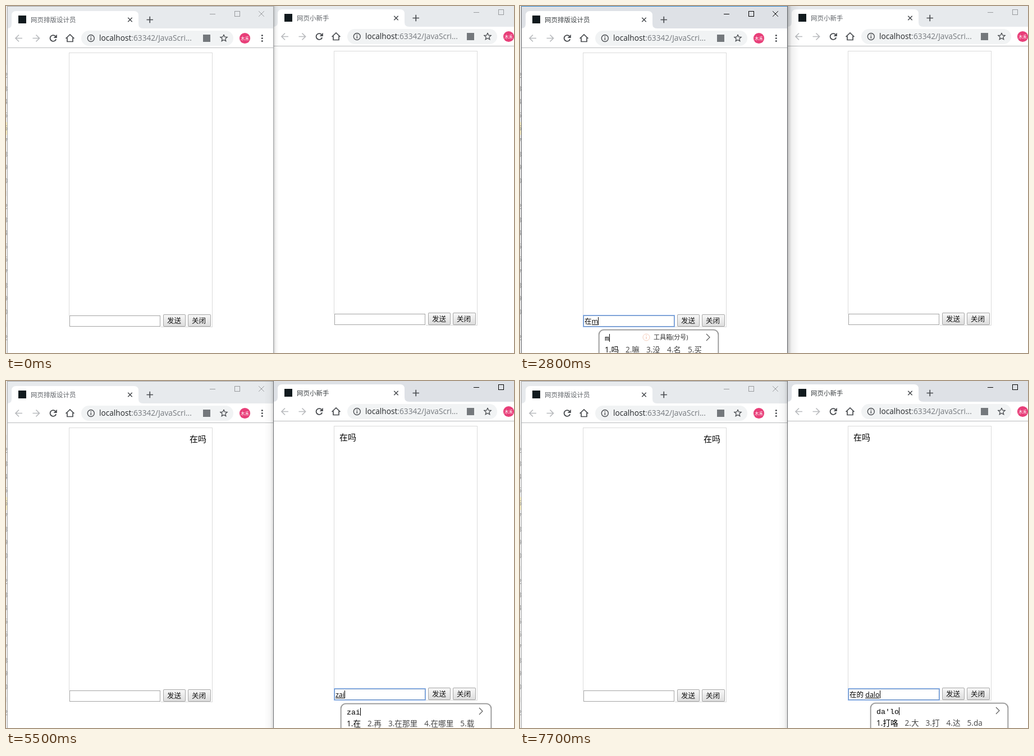
Write an HTML page with a canvas that moves like this. It is 905 by 619 pixels and loops after 8 s.

```html
<!DOCTYPE html>
<html lang="zh">
<head>
<meta charset="utf-8">
<style>
html, body { margin: 0; width: 905px; height: 619px; overflow: hidden; background: #fff; }
canvas { display: block; }
</style>
</head>
<body>
<canvas id="stage" width="905" height="619"></canvas>
<script>
const ctx = document.getElementById('stage').getContext('2d');
const LOOP = 8000;
const SANS = '"Open Sans", "Noto Sans CJK SC", "Noto Sans CJK", sans-serif';
const MONO = '"Liberation Mono", monospace';
const INK = '#4a4d51';

const popup = (left, right, top, typed, words, hint) =>
  ({ left, right, top, typed, words: words.split(' '), hint });
const D_WORDS = '的 到 点 _(:з」∠)_ の';
const M_WORDS = '吗 嘛 没 名 买';
const ZA_WORDS = '咋 砸 杂 咱 扎';
const ZAI_WORDS = '在 再 在那里 在哪里 载';
const DALO_WORDS = '打咯 大 打 达 da';

// Each entry changes the state from its time onwards.
const timeline = [
  [0, { active: '', text: '', comp: '', caret: false, pop: null, button: '', sent: false }],
  [900, { active: 'left', focus: 'left', caret: true }],
  [1400, { caret: false }],
  [1900, { comp: 'za', caret: true, pop: popup(124, 347, 576, 'za', ZA_WORDS) }],
  [2100, { comp: 'zai', pop: popup(124, 400, 576, 'zai', ZAI_WORDS) }],
  [2200, { text: '在', comp: '', pop: null }],
  [2400, { comp: 'm', pop: popup(140, 354, 577, 'm', M_WORDS) }],
  [2800, { pop: popup(140, 354, 577, 'm', M_WORDS, '工具箱(分号)') }],
  [2900, { comp: 'ma', pop: popup(140, 354, 577, 'ma', '吗 嘛 妈 马 骂') }],
  [3000, { text: '在吗', comp: '', pop: null }],
  [3500, { caret: false }],
  [3600, { button: 'hover' }],
  [3900, { button: 'pressed', focus: '' }],
  [4000, { button: 'hover', text: '', sent: true }],
  [4700, { active: 'right', focus: 'right', caret: true, button: '' }],
  [5200, { comp: 'z', pop: popup(596, 812, 575, 'z', '在 这 中 子 做') }],
  [5300, { comp: 'za', pop: popup(596, 812, 575, 'za', ZA_WORDS) }],
  [5500, { comp: 'zai', pop: popup(596, 865, 575, 'zai', ZAI_WORDS) }],
  [5700, { text: '在', comp: '', pop: null }],
  [6000, { comp: 'd', pop: popup(609, 854, 575, 'd', D_WORDS) }],
  [6200, { comp: 'de', pop: popup(609, 854, 575, 'de', '的 得 地 德 嘚') }],
  [6400, { text: '在的', comp: '', pop: null }],
  [6500, { text: '在的 ' }],
  [6700, { comp: 'd', pop: popup(625, 870, 575, 'd', D_WORDS) }],
  [6900, { comp: 'da', pop: popup(625, 893, 575, 'da', '大 打 达 搭 哒') }],
  [7200, { comp: 'dal', pop: popup(625, 904, 575, "da'l", '打了 大量 大理 打 大') }],
  [7600, { comp: 'dalo', pop: popup(625, 904, 575, "da'lo", DALO_WORDS) }],
  [7700, { pop: popup(624, 870, 574, "da'lo", DALO_WORDS) }]
];

const stateAt = t => Object.assign({}, ...timeline.filter(([at]) => at <= t).map(([, patch]) => patch));

function rect(x, y, w, h, fill) {
  ctx.fillStyle = fill;
  ctx.fillRect(x, y, w, h);
}

function frame(x, y, w, h, color) {
  ctx.strokeStyle = color;
  ctx.lineWidth = 1;
  ctx.strokeRect(x + .5, y + .5, w - 1, h - 1);
}

function line(color, width, ...strokes) {
  ctx.strokeStyle = color;
  ctx.lineWidth = width;
  ctx.beginPath();
  for (const points of strokes) {
    points.forEach(([x, y], i) => i ? ctx.lineTo(x, y) : ctx.moveTo(x, y));
  }
  ctx.stroke();
}

function round(x, y, w, h, radius, fill) {
  ctx.beginPath();
  ctx.roundRect(x, y, w, h, radius);
  ctx.fillStyle = fill;
  ctx.fill();
}

function disc(x, y, r, fill) {
  ctx.beginPath();
  ctx.arc(x, y, r, 0, 7);
  ctx.fillStyle = fill;
  ctx.fill();
}

function ring(x, y, r, color, width) {
  ctx.beginPath();
  ctx.arc(x, y, r, 0, 7);
  ctx.strokeStyle = color;
  ctx.lineWidth = width;
  ctx.stroke();
}

// Draws text and returns the x where it ends.
function label(str, x, y, size, color, family = SANS) {
  ctx.font = `${size}px ${family}`;
  ctx.fillStyle = color;
  ctx.fillText(str, x, y);
  return x + ctx.measureText(str).width;
}

function cross(x, y, r, color, width) {
  line(color, width, [[x - r, y - r], [x + r, y + r]], [[x + r, y - r], [x - r, y + r]]);
}

function arrow(x, y, dir) {
  line('#b9bbbe', 1.7, [[x - 6 * dir, y], [x + 6 * dir, y]],
    [[x, y - 6], [x + 6 * dir, y], [x, y + 6]]);
}

function reload(x, y) {
  ctx.beginPath();
  ctx.arc(x, y, 5.4, .3, 5.5);
  ctx.strokeStyle = INK;
  ctx.lineWidth = 1.9;
  ctx.stroke();
  ctx.beginPath();
  ctx.moveTo(x + 6.8, y - 6.8);
  ctx.lineTo(x + 6.8, y - .6);
  ctx.lineTo(x + .6, y - .6);
  ctx.fillStyle = INK;
  ctx.fill();
}

function home(x, y) {
  line(INK, 1.7, [[x - 7.5, y + .5], [x, y - 6.5], [x + 7.5, y + .5]],
    [[x - 5, y - 1], [x - 5, y + 6], [x + 5, y + 6], [x + 5, y - 1]]);
}

function star(x, y) {
  const points = Array.from({ length: 11 }, (_, i) => {
    const a = -Math.PI / 2 + i * Math.PI / 5, r = i % 2 ? 2.9 : 6.4;
    return [x + r * Math.cos(a), y + r * Math.sin(a)];
  });
  line(INK, 1.3, points);
}

function tab(title, active) {
  ctx.beginPath();
  ctx.moveTo(2, 40);
  ctx.quadraticCurveTo(10, 40, 10, 32);
  ctx.lineTo(10, 17);
  ctx.quadraticCurveTo(10, 9, 18, 9);
  ctx.lineTo(228, 9);
  ctx.quadraticCurveTo(236, 9, 236, 17);
  ctx.lineTo(236, 32);
  ctx.quadraticCurveTo(236, 40, 244, 40);
  ctx.fillStyle = '#fff';
  ctx.fill();
  rect(22, 17, 14, 14, '#111a1e');
  label(title, 44, 29, 11.5, active ? '#3c4043' : '#5f6368');
  cross(221, 24.5, 3.7, INK, 1.6);
  line(INK, 1.7, [[250.5, 24.5], [262, 24.5]], [[256.25, 18.7], [256.25, 30.3]]);
}

// Browser frame in the left window's coordinates; `inset` narrows it.
function chrome(title, active, dx, dy, inset) {
  ctx.save();
  ctx.translate(dx, dy);
  rect(2, 0, 475, 40, active ? '#dee1e6' : '#e7eaed');
  rect(2, 40, 475, 600, '#fff');
  rect(2, 74, 475, 1, '#b8babc');
  tab(title, active);
  arrow(23, 57.5, -1);
  arrow(53.5, 57.5, 1);
  reload(84, 57.5);
  home(114, 57.5);
  round(134, 44, 271 - inset, 27, 13.5, '#f1f3f4');
  ring(151.3, 57.5, 6, INK, 1.4);
  rect(150.6, 56.5, 1.5, 4.3, INK);
  rect(150.6, 53.8, 1.5, 1.5, INK);
  const end = label('localhost', 166, 62, 13.7, '#24272a');
  label(':63342/JavaScri...', end, 62, 13.7, '#75797e');

  ctx.translate(-inset, 0);
  const caption = active ? '#000' : '#999b9e';
  rect(363, 14, 10, 1, caption);
  frame(407, 9, 10, 10, caption);
  cross(455, 14, 4.8, caption, 1);
  rect(351, 51, 13, 13, '#74787c');
  star(388, 57.5);
  disc(425.5, 57.5, 9.6, '#e83f79');
  label('木禾', 418, 60.5, 7.5, '#fff');
  for (const y of [52.5, 57.5, 62.5]) disc(456.3, y, 1.5, INK);
  ctx.restore();
}

function button(text, x, w, mode) {
  const fill = ctx.createLinearGradient(0, 551, 0, 572);
  fill.addColorStop(0, mode === 'pressed' ? '#ddd' : '#f7f7f7');
  fill.addColorStop(1, mode === 'pressed' ? '#f0f0f0' : '#dcdcdc');
  round(x, 550, w, 22, 2, mode ? '#8a8a8a' : '#a6a6a6');
  round(x + 1, 551, w - 2, 20, 1, fill);
  label(text, x + 7, 566, 12.5, '#111');
}

function chat(side, dx, dy, s) {
  const owner = s.active === side;
  const focused = s.focus === side;
  ctx.save();
  ctx.translate(dx, dy);
  frame(112, 83, 256, 490, '#dadada');
  rect(112, 552, 164, 21, '#fff');
  frame(113, 552, 162, 20, focused ? '#6f93c4' : '#a3a3a3');
  if (focused) frame(112, 551, 164, 22, '#8fb5ee');
  if (owner) {
    const start = label(s.text, 115, 566.5, 12.5, '#000');
    const end = label(s.comp, start, 566.5, 12.5, '#000');
    if (s.comp) rect(Math.round(start), 568, Math.round(end - start), 1, '#000');
    if (focused && s.caret) rect(Math.round(end), 555, 1, 14, '#000');
  }
  button('发送', 280, 40, owner ? s.button : '');
  button('关闭', 324, 41, '');
  if (s.sent) label('在吗', side === 'left' ? 327 : 122, 109, 15, '#000');
  ctx.restore();
}

function drawPopup({ left, right, top, typed, words, hint }) {
  const width = right - left;
  ctx.save();
  ctx.shadowColor = 'rgba(0,0,0,.2)';
  ctx.shadowBlur = 3;
  round(left, top, width, 70, 9, '#8f8f8f');
  ctx.restore();
  round(left + 1.5, top + 1.5, width - 3, 70, 8, '#fff');

  const end = label(typed, left + 11, top + 20, 13.33, '#000', MONO);
  rect(Math.round(end), top + 8, 1, 14, '#000');
  if (hint) {
    ring(left + 85, top + 14, 6, '#f5cdbb', 1);
    rect(left + 84.5, top + 13, 1, 4, '#f2b49a');
    rect(left + 84.5, top + 10, 1, 1.5, '#f2b49a');
    label(hint, left + 98, top + 18, 11, '#333');
  }
  const tip = right - 16;
  line('#555', 1.1, [[tip - 6, top + 8], [tip, top + 14], [tip - 6, top + 20]]);

  let x = left + 11;
  words.forEach((word, i) => {
    x = label(`${i + 1}.${word}`, x, top + 41, 13.6, i ? '#444' : '#000') + 12;
  });
}

function shade(from, to, strength) {
  const g = ctx.createLinearGradient(from, 0, to, 0);
  g.addColorStop(0, `rgba(0,0,0,${strength})`);
  g.addColorStop(.35, `rgba(0,0,0,${strength / 4})`);
  g.addColorStop(1, 'rgba(0,0,0,0)');
  rect(Math.min(from, to), 0, Math.abs(to - from), 619, g);
}

// Sliver of an editor's line numbers behind the left window.
function gutter() {
  rect(0, 0, 3, 619, '#f0f0f0');
  rect(0, 207, 3, 23, '#fbf0c4');
  for (let i = 0; i < 22; i++) label(String((i + 1) % 10), -4, 105 + i * 23.4, 12, '#999');
}

function draw(t) {
  const s = stateAt(t);
  const leftActive = s.active === 'left';
  const rightActive = s.active === 'right';
  ctx.clearRect(0, 0, 905, 619);

  chrome('网页小新手', rightActive, 474, -3, 4);
  chat('right', 472, -3, s);

  ctx.save();
  ctx.beginPath();
  ctx.rect(0, 0, 477, 619);
  ctx.clip();
  gutter();
  chrome('网页排版设计员', leftActive, 0, 0, 0);
  chat('left', 0, 0, s);
  const edge = leftActive ? '#5c5f63' : '#a4a6a8';
  rect(2, 0, 1, 619, edge);
  rect(2, 0, 475, 1, leftActive ? '#2f86cf' : edge);
  ctx.restore();

  if (rightActive) {
    shade(476, 460, .12);
    rect(476, 0, 1, 619, '#6a6c6f');
  } else {
    rect(476, 0, 1, 619, edge);
    shade(477, leftActive ? 497 : 486, leftActive ? .24 : .2);
  }
  if (s.pop) drawPopup(s.pop);
}

const start = performance.now();
function tick() {
  draw((performance.now() - start) % LOOP);
  requestAnimationFrame(tick);
}
tick();
</script>
</body>
</html>
```
